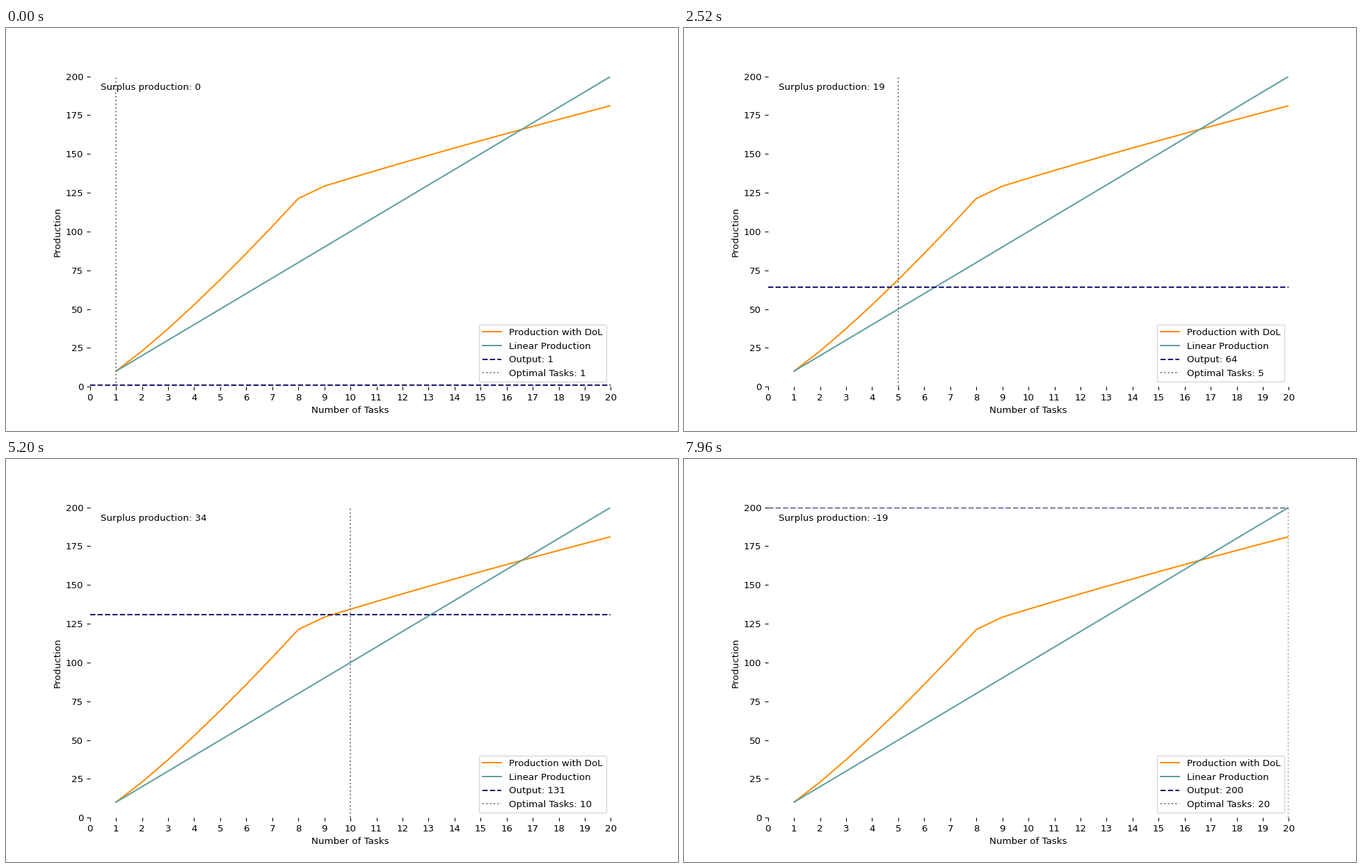
A matplotlib script that plays this animation: 966 px wide and 580 px high, repeating every 8000 ms.

```python
import numpy as np
import matplotlib.pyplot as plt
from matplotlib.animation import FuncAnimation

WIDTH, HEIGHT = 966, 580
DPI = WIDTH / 10   # ten inches wide
EPS = 0.01         # keeps the pixel size from truncating downwards
MAX_TASKS = 20
MAX_OUTPUT = 200
RATE = 10          # production per task without specialisation
LIMIT = 8          # tasks after which returns diminish


def produce(t):
    """Increasing returns up to LIMIT, diminishing returns beyond it."""
    rising = RATE * t ** 1.2
    slowing = RATE * (LIMIT ** 1.2 + t ** 0.8 - 5)
    return np.where(t <= LIMIT, rising, slowing)


tasks = np.arange(1, MAX_TASKS + 1)
divided = produce(tasks.astype(float))
linear = RATE * tasks

plt.rcParams["font.family"] = "DejaVu Sans"
fig, ax = plt.subplots(figsize=((WIDTH + EPS) / DPI, (HEIGHT + EPS) / DPI),
                       dpi=DPI)
ax.plot(tasks, divided, color="darkorange", label="Production with DoL")
ax.plot(tasks, linear, color="cadetblue", label="Linear Production")
level = ax.axhline(1, color="midnightblue", linestyle="--")
best = ax.axvline(1, color="gray", linestyle=":")
note = ax.text(0.02, 0.98, "", transform=ax.transAxes, va="top")

ax.set(xlim=(0, MAX_TASKS), ylim=(0, MAX_OUTPUT),
       xticks=range(MAX_TASKS + 1),
       xlabel="Number of Tasks", ylabel="Production")
ax.spines[:].set_visible(False)


def update(i):
    output = i + 1
    k = min(np.searchsorted(divided, output), MAX_TASKS - 1)
    surplus = round(float(divided[k] - linear[k]))

    level.set_ydata([output, output])
    level.set_label(f"Output: {output}")
    best.set_xdata([tasks[k], tasks[k]])
    best.set_label(f"Optimal Tasks: {tasks[k]}")
    note.set_text(f"Surplus production: {surplus}")
    # Rebuilt each time so it moves to the emptiest spot
    ax.legend(loc="best")


anim = FuncAnimation(fig, update, frames=MAX_OUTPUT, interval=40,
                     repeat=True, repeat_delay=0)
plt.show()
```
